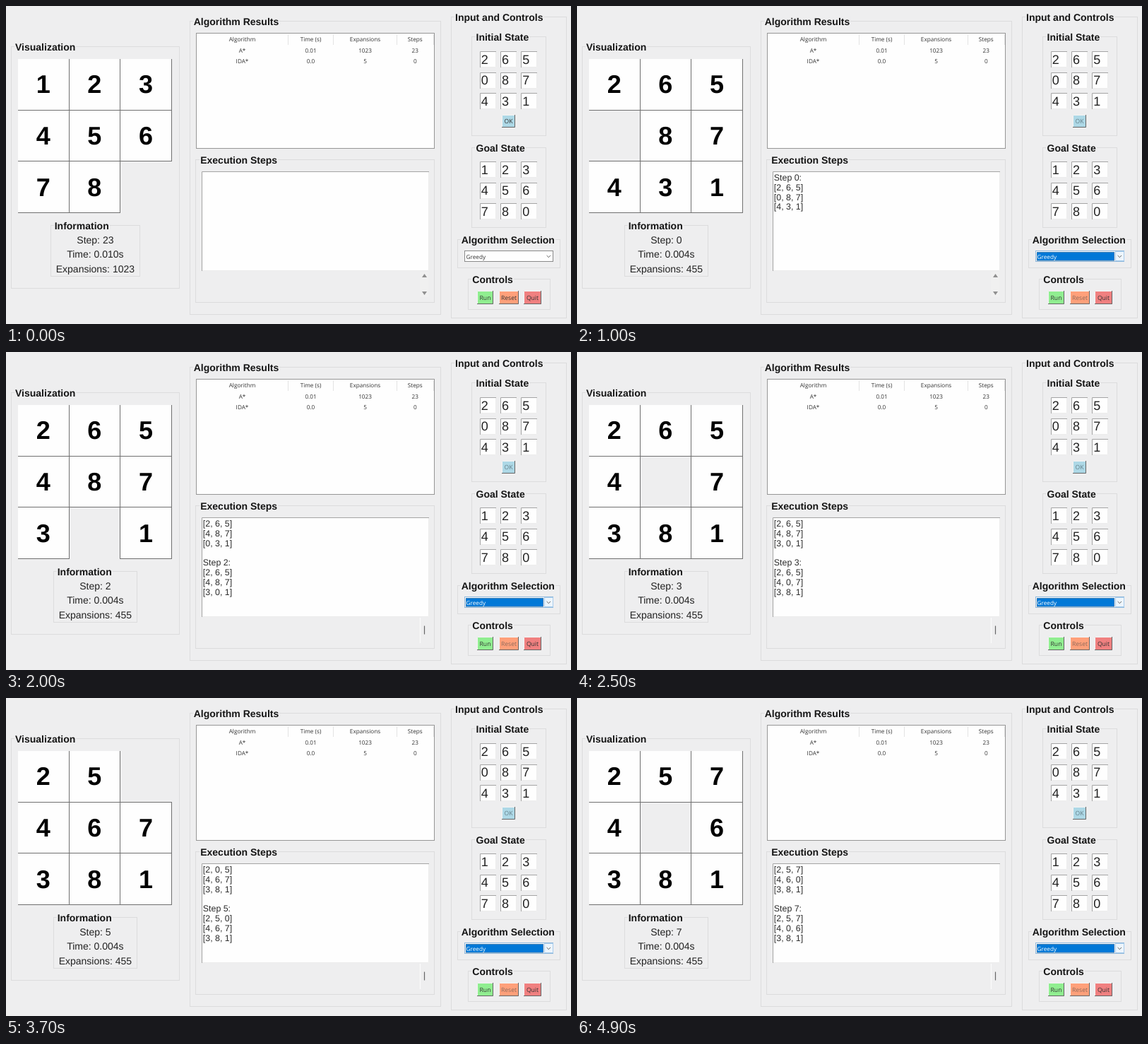
These frames come from a looping animation (800x450 px, 5000 ms). An HTML page:

```html
<!DOCTYPE html>
<html lang="en">
<head>
<meta charset="utf-8">
<title>Eight puzzle solver</title>
<style>
  html, body { margin: 0; width: 100%; height: 100%; overflow: hidden; background: #eeeeef; }
  svg { display: block; width: 800px; height: 450px; }
  text { font-family: "Liberation Sans", Arial, sans-serif; font-size: 14px; fill: #222;
    white-space: pre; text-rendering: geometricPrecision; }
  .title { font-weight: bold; fill: #151515; }
  .mid { text-anchor: middle; }
  .ui { font-family: "Open Sans", "Noto Sans", sans-serif; font-size: 8.2px; fill: #333; }
  .btn { font-size: 8.6px; }
  .tile { font-size: 36px; font-weight: bold; fill: #000; }
  .digit { font-size: 18px; }
  .log { font-size: 12.4px; fill: #2c2c2c; }
</style>
</head>
<body>
<svg id="stage" viewBox="0 0 800 450"></svg>
<script>
const NS = "http://www.w3.org/2000/svg";
const stage = document.getElementById("stage");
const BG = "#eeeeef";
const LOOP = 5000, START = 1000, STEP = 500;

function add(parent, tag, attrs, content) {
  const el = document.createElementNS(NS, tag);
  for (const k in attrs) el.setAttribute(k, attrs[k]);
  if (content !== undefined) el.textContent = content;
  parent.appendChild(el);
  return el;
}
const rect = (p, x, y, w, h, fill, stroke = "none") =>
  add(p, "rect", { x, y, width: w, height: h, fill, stroke });
const path = (p, d, stroke, width = 1, fill = "none") =>
  add(p, "path", { d, stroke, "stroke-width": width, fill });
const label = (p, x, y, cls, s) => add(p, "text", { x, y, class: cls }, s);
const group = (p = stage) => add(p, "g", {});
const show = (el, on) => el.setAttribute("visibility", on ? "visible" : "hidden");

// Labelled frame: the title sits on the top line.
function frame(p, x, y, x2, y2, title, tx = x + 6) {
  rect(p, x + .5, y + .5, x2 - x - 1, y2 - y - 1, "none", "#dcdcdd");
  const t = label(p, tx, y + 5.6, "title", title);
  const back = rect(p, tx - 1, y - 7, t.getComputedTextLength() + 2, 15, BG);
  p.insertBefore(back, t);
}

// Sunken white field
function field(p, x, y, x2, y2) {
  rect(p, x, y, x2 - x, y2 - y, "#fefefe");
  path(p, `M${x + .5} ${y2}V${y + .5}H${x2}`, "#a4a4a4");
  path(p, `M${x + 1} ${y2 - .5}H${x2 - .5}V${y + 1}`, "#ececec");
}

function button(x, y, x2, y2, fill, name) {
  rect(stage, x, y, x2 - x, y2 - y, fill);
  path(stage, `M${x + .5} ${y2}V${y + .5}H${x2}`, "#f4f4f4");
  path(stage, `M${x} ${y2 - .5}H${x2 - .5}V${y}`, "#666");
  return label(stage, (x + x2) / 2, (y + y2) / 2 + 3, "ui btn mid", name);
}

function numberGrid(top, digits) {
  [...digits].forEach((d, i) => {
    const x = 671 + (i % 3) * 29.2, y = top + Math.floor(i / 3) * 29.7;
    field(stage, Math.round(x), Math.round(y), Math.round(x) + 23, Math.round(y) + 23);
    label(stage, x + 1.8, y + 17.5, "digit", d);
  });
}

// Static layout
rect(stage, 0, 0, 800, 450, BG);
frame(stage, 7, 57, 246, 400, "Visualization");
frame(stage, 260, 21, 616, 437, "Algorithm Results", 265.7);
frame(stage, 268, 217, 607, 420, "Execution Steps", 275.2);
frame(stage, 630, 15, 794, 442, "Input and Controls");
frame(stage, 659, 43, 765, 184, "Initial State", 665.5);
frame(stage, 659, 200, 765, 314, "Goal State", 665.5);
frame(stage, 639, 330, 785, 371, "Algorithm Selection", 644.7);
frame(stage, 654, 386, 771, 430, "Controls", 660.3);

// Results table
rect(stage, 269.5, 38.5, 337, 163, "#fefefe", "#969696");
path(stage, "M399.5 40V55M463.5 40V55M553.5 40V55M605.5 40V55", "#e3e3e3");
[["Algorithm", "Time (s)", "Expansions", "Steps"],
 ["A*", "0.01", "1023", "23"],
 ["IDA*", "0.0", "5", "0"]].forEach((row, r) =>
  row.forEach((s, c) => label(stage, [334.5, 431.5, 508.5, 579.3][c], [50.2, 66.2, 80.6][r], "ui mid", s)));

numberGrid(64, "265087431");
numberGrid(220, "123456780");
const ok = button(702, 154, 721, 172, "#add8e6", "OK");
button(667, 403, 690, 422, "#90ee90", "Run");
const reset = button(698, 403, 726, 422, "#ffa07a", "Reset");
button(733, 403, 758, 422, "#f08080", "Quit");

// Combo box
const combo = rect(stage, 649.5, 346.5, 125, 15, "#fefefe", "#8a8a8a");
const picked = group();
rect(picked, 651, 348, 110, 12.5, "#0078d7");
add(picked, "rect", { x: 651, y: 348.5, width: 110, height: 12, fill: "none",
  stroke: "#d98a4a", "stroke-width": .5, "stroke-dasharray": "1 1" });
rect(picked, 762.5, 347.5, 12, 13, "#edf5fc", "#a9cdec");
path(stage, "M765.6 353L768.3 355.7L771 353", "#666");
const choice = label(stage, 651.6, 357.5, "ui", "Greedy");

// Step log and its scrollbar
field(stage, 277, 234, 599, 375);
const log = [...Array(10)].map((_, i) => label(stage, 278.8, 246.8 + i * 13.86, "log", ""));
const idleBar = group(), liveBar = group();
rect(idleBar, 586, 376, 12, 36, "#f0f0f0");
path(idleBar, "M589 384L592.5 379L596 384ZM589 404L592.5 409L596 404Z", "none", 0, "#909090");
path(liveBar, "M586.5 376V412", "#fbfbfb", 1.2);
path(liveBar, "M592.5 387.5V399.5", "#666", 1.2);

// Board, clipped so outer left and top outlines stay hidden
const board = add(stage, "svg", { x: 17, y: 75, width: 218, height: 218, overflow: "hidden" });
const edge = i => i ? Math.floor(i * 72.4) + .5 : -1;
const tiles = [...Array(9)].map((_, i) => {
  const g = group(board), c = i % 3, r = Math.floor(i / 3);
  rect(g, edge(c), edge(r), edge(c + 1) - edge(c), edge(r + 1) - edge(r), "#fefefe", "#707070");
  return { g, text: label(g, 35.7 + c * 72.6, 48.3 + r * 72.6, "tile mid", "") };
});

// Information box in its two widths
const wideBox = group(), slimBox = group();
frame(wideBox, 63, 310, 190, 383, "Information", 68.7);
frame(slimBox, 67, 310, 186, 383, "Information", 72.7);
const info = [335.9, 356.4, 376.7].map(y => label(stage, 126.4, y, "mid", ""));

// Solver states: the blank walks through these cells
const states = [[2, 6, 5, 0, 8, 7, 4, 3, 1]];
[3, 6, 7, 4, 1, 2, 5, 4].reduce((from, to) => {
  const s = states[states.length - 1].slice();
  s[from] = s[to];
  s[to] = 0;
  states.push(s);
  return to;
});
const lines = states.map((s, k) => [`Step ${k}:`,
  ...[0, 3, 6].map(r => `[${s.slice(r, r + 3).join(", ")}]`), ""]);

function draw(k) {
  const running = k >= 0;
  const cells = running ? states[k] : [1, 2, 3, 4, 5, 6, 7, 8, 0];
  cells.forEach((n, i) => {
    show(tiles[i].g, n > 0);
    tiles[i].text.textContent = n;
  });
  info[0].textContent = `Step: ${running ? k : 23}`;
  info[1].textContent = `Time: ${running ? "0.004" : "0.010"}s`;
  info[2].textContent = `Expansions: ${running ? 455 : 1023}`;
  show(wideBox, !running);
  show(slimBox, running);

  const first = Math.max(0, 5 * k - 4);
  const shown = lines.slice(0, k + 1).flat().slice(first);
  log.forEach((t, i) => t.textContent = shown[i] || "");
  show(idleBar, k < 1);
  show(liveBar, k >= 1);

  show(picked, running);
  combo.setAttribute("stroke", running ? "#8fb8dc" : "#8a8a8a");
  choice.style.fill = running ? "#fff" : "";
  ok.style.fill = running ? "#65808a" : "";
  reset.style.fill = running ? "#8d6a5c" : "";
}

let last;
const begin = performance.now();
function tick(now) {
  const t = Math.max(0, now - begin) % LOOP;
  const k = Math.max(-1, Math.floor((t - START) / STEP));
  if (k !== last) draw(last = k);
  requestAnimationFrame(tick);
}
tick(begin);
</script>
</body>
</html>
```
